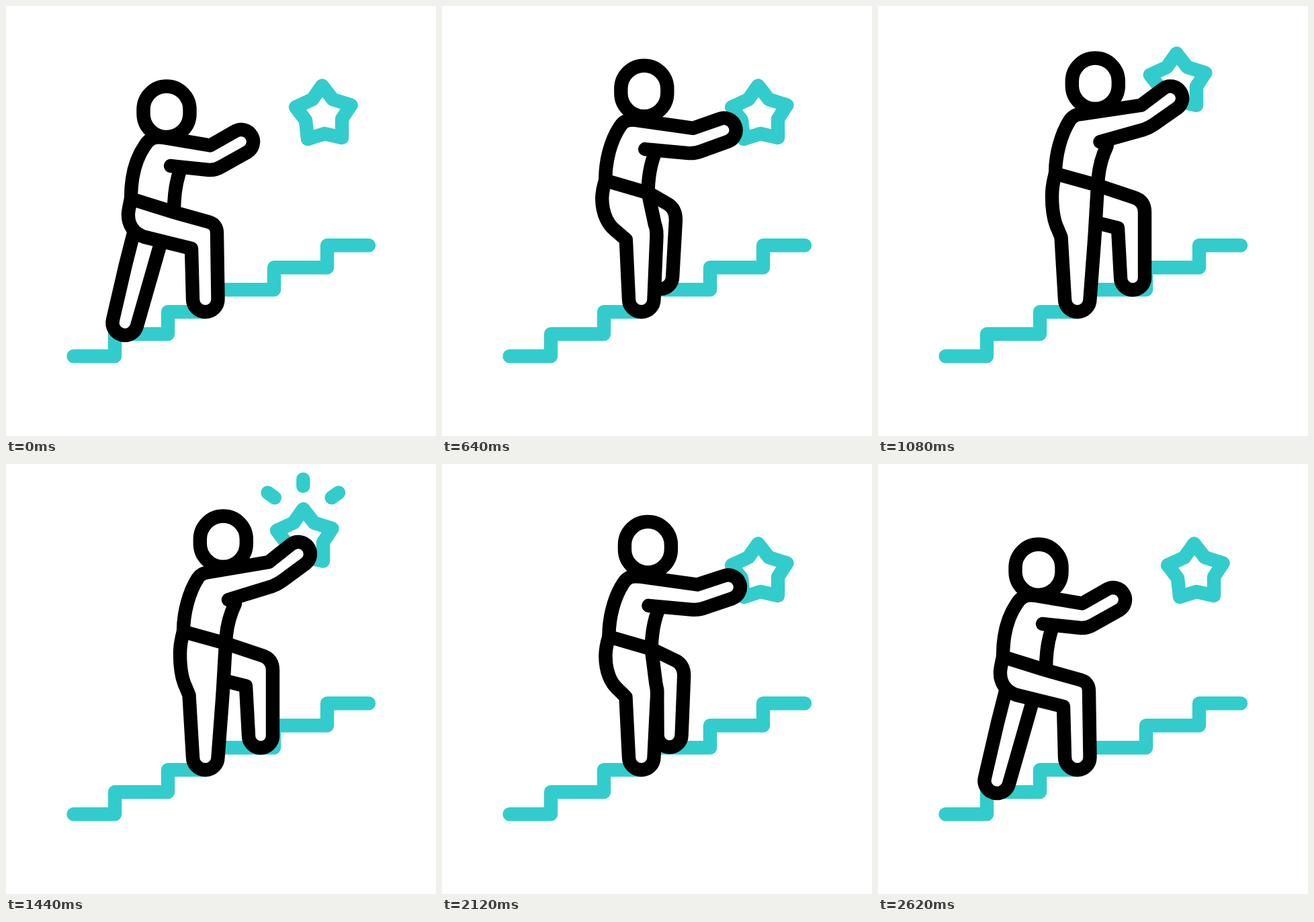
An HTML page that plays this animation: 640x640 px, repeating every 3000 ms.

```html
<!DOCTYPE html>
<html lang="en">
<head>
<meta charset="utf-8">
<title>Climbing to the star</title>
<style>
  html, body { margin: 0; width: 100%; height: 100%; overflow: hidden; background: #fff; }
  svg { display: block; width: 100vw; height: 100vh; }
  path, rect { fill: #fff; stroke: #000; stroke-width: 20.4; stroke-linecap: round; stroke-linejoin: round; }
  .teal path { stroke: #33cccc; }
  .line { fill: none; }
</style>
</head>
<body>
<svg viewBox="0 0 640 640">
  <g class="teal">
    <path class="line" d="M100.5 521.3H162V488.2H241V455.2H297M320 422.2H399V389.2H478V356.2H540"/>
    <g id="sparks">
      <path d="M442.3 21.6V32"/>
      <path d="M388.5 42L399 49.5"/>
      <path d="M496 42L485.5 49.5"/>
    </g>
    <path id="star" d="M470.5 118.5L486.5 139L513.500 147.500L500 168L500 196L474 190L449 198L446 170L431 150.500L456 139Z"/>
  </g>
  <path id="farLeg"/>
  <path id="nearLeg"/>
  <path id="torso"/>
  <path id="chest" class="line"/>
  <rect id="head" x="204.5" y="119.5" width="69" height="75.5" rx="34.5"/>
</svg>
<script>
  const LOOP = 3000, TICK = 20, MIRROR = 1400;
  const el = id => document.getElementById(id);
  const clamp = v => Math.min(1, Math.max(0, v));
  const span = (t, from, to) => clamp((t - from) / (to - from));

  // Each part: outlines with matching commands, and the time each is reached.
  const parts = {
    farLeg: {
      times: [200, 500, 800],
      poses: [
        'M192 330L178 385L159 467A18 18 0 0 0 195 476L231 350Q232 345 233 342L235 335',
        'M262 325L265 345L260 402A18 18 0 0 0 296 402L305 328Q305 313 298 304L290 288',
        'M327 323L357 330.5L361 404A18 18 0 0 0 397 405L397 307Q397 290 381 285L327 267'
      ]
    },
    nearLeg: {
      times: [200, 500, 800],
      poses: [
        'M186 287Q183 300 182 308C181 325 190 338 205 343.5L276 361L278 436.5A18.5 18.5 0 0 0 315.5 436.5L314 338Q314 325 302 321.5L250 307Z',
        'M225 268.5Q221 279 220 288C220 311 235 328 248 334L275 351L278 436.5A18.5 18.5 0 0 0 315.5 436.5L317.2 337Q317.3 323 311.6 317L289 288Z',
        'M264 249.5Q259 267 259 283C259 311 264 325 268 333L272.5 344L278 436.5A18.5 18.5 0 0 0 315.5 436.5L322 350Q322.5 342 323 335L327 267Z'
      ]
    },
    torso: {
      times: [200, 800, 1100],
      poses: [
        'M186 286C186 255 192 229 206.5 208C212 199 219 194 232 195.5L304 207.5L341 186.4A17.9 17.9 0 0 1 359 217.6L319 240Q311 244.5 302 244L245 238',
        'M264 249.5C264 222 272 191 285.5 170C291 161 297 159.500 309 160.5L399 172.5L439.9 161.3A17.9 17.9 0 0 1 450.1 195.9L411 207Q402 210.5 391 210L323 204',
        'M264 249.5C264 222 272 191 285.5 170C290 164 294 162 302 161L391 146L424 119.8A17.9 17.9 0 0 1 446 148.2L411 174Q404 179 396 182L331 202'
      ]
    },
    chest: {
      times: [200, 800, 1100],
      poses: [
        'M258 248Q250 272 250 306',
        'M337 212Q328 235 327 267',
        'M341 208Q328 235 327 267'
      ]
    }
  };

  // Blends the numbers of two path strings.
  function blend(a, b, k) {
    const goal = b.match(/[\d.]+/g);
    let i = 0;
    return a.replace(/[\d.]+/g, n => +n + (goal[i++] - n) * k);
  }

  function outline({ times, poses }, t) {
    const i = t < times[1] ? 0 : 1;
    return blend(poses[i], poses[i + 1], span(t, times[i], times[i + 1]));
  }

  const move = (node, x, y) => node.setAttribute('transform', `translate(${x} ${y})`);

  const sparks = [...el('sparks').children];
  const inward = [[0, 1], [0.81, 0.58], [-0.81, 0.58]];

  function draw(time) {
    const t = time > MIRROR ? 2 * MIRROR - time : time;
    for (const id in parts) el(id).setAttribute('d', outline(parts[id], t));

    const climb = span(t, 200, 800);
    move(el('head'), 84.3 * climb, -42 * climb);

    const lift = span(t, 800, 1100);
    move(el('star'), -28 * lift, -51.5 * lift);

    const burst = span(t, 1100, 1400);
    const back = 64 * (1 - burst) ** 2;
    el('sparks').style.display = burst > 0 ? '' : 'none';
    sparks.forEach((s, i) => move(s, inward[i][0] * back, inward[i][1] * back));
  }

  const start = performance.now();
  function frame() {
    const time = (performance.now() - start) % LOOP;
    draw(Math.floor(time / TICK) * TICK);
    requestAnimationFrame(frame);
  }
  frame();
</script>
</body>
</html>
```
